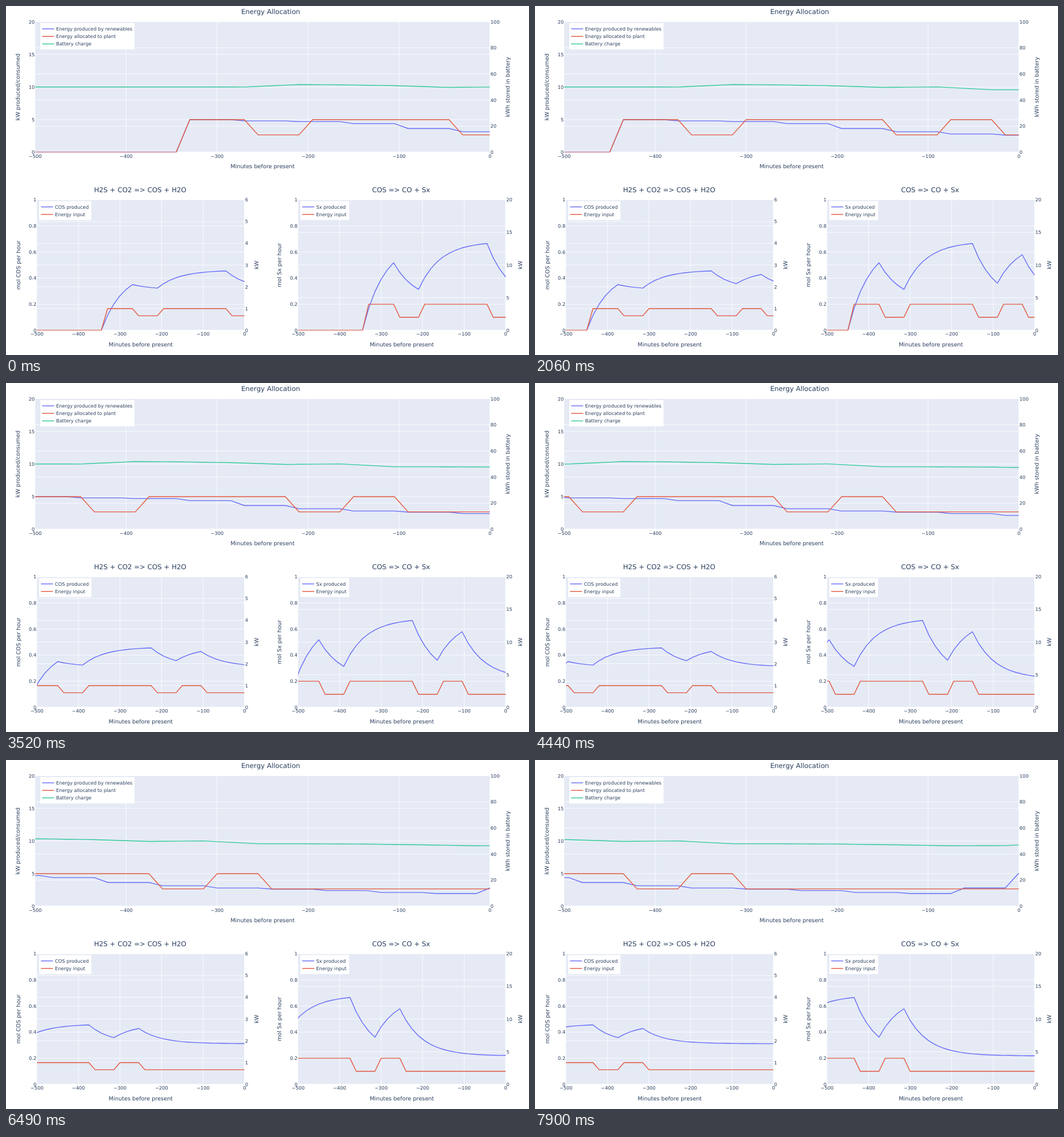
Animation of 916 by 611 pixels, one loop 8000 ms. Source, as an HTML page:

```html
<!DOCTYPE html>
<html lang="en">
<head>
<meta charset="utf-8">
<title>Energy Allocation</title>
<style>
  html, body { margin: 0; width: 100%; height: 100%; overflow: hidden; background: #fff; }
  svg { display: block; width: 916px; height: 611px; }
  text { font-family: "DejaVu Sans", Verdana, sans-serif; fill: #2a3f5f; text-rendering: geometricPrecision; }
  .tick { font-size: 8.3px; }
  .axis { font-size: 9.7px; }
  .title { font-size: 11.8px; }
  .trace { fill: none; stroke-width: 1.4; stroke-linejoin: round; }
</style>
</head>
<body>
<svg id="stage" viewBox="0 0 916 611"></svg>
<script>
const BLUE = '#666cf6', RED = '#e4563c', GREEN = '#2fc898';
const LOOP = 8000, STEP = 15, SPAN = 500;
const stage = document.getElementById('stage');

function add(parent, tag, attrs, text) {
  const node = document.createElementNS('http://www.w3.org/2000/svg', tag);
  for (const key in attrs) node.setAttribute(key, attrs[key]);
  if (text !== undefined) node.textContent = text;
  parent.append(node);
  return node;
}

function label(cls, x, y, text, anchor = 'middle', turned = false) {
  const attrs = { class: cls, x, y, 'text-anchor': anchor };
  if (turned) attrs.transform = `rotate(-90 ${x} ${y})`;
  add(stage, 'text', attrs, text);
}

// Simulated plant: one sample every 15 minutes, index 0 = present at loop start.
const FIRST = -36, LAST = 26, START = -22;
const SUPPLY = [5, 4.81, 4.7, 4.39, 3.64, 3.15, 2.8, 2.63, 2.4, 2.12, 1.95, 2.81, 5.1];
const KEEP = 0.752;

function simulate() {
  const samples = [];
  let battery = 50, cos = 0, sx = 0;
  for (let k = FIRST; k <= LAST; k++) {
    const running = k >= START;
    const full = k <= -18 || (k >= -13 && k <= -3) || (k >= 2 && k <= 5);
    const supply = running ? SUPPLY[Math.floor((k - START) / 4)] : 0;
    const cosPower = running ? (full ? 1 : 2 / 3) : 0;
    const sxPower = running ? (full ? 4 : 2) : 0;
    const plant = cosPower + sxPower;
    if (running) {
      const surplus = (supply - plant) / 4;
      battery += surplus > 0 ? surplus * 0.9 : surplus;
      const cosGoal = full ? 0.461 : 0.311, sxGoal = full ? 0.681 : 0.218;
      cos = cosGoal + (cos - cosGoal) * KEEP;
      sx = sxGoal + (sx - sxGoal) * KEEP;
    }
    samples.push({ k, supply, plant, battery, cos, sx, cosPower, sxPower });
  }
  return samples;
}
const samples = simulate();

const charts = [
  {
    left: 51.2, right: 847.6, top: 27.5, bottom: 256.1,
    title: 'Energy Allocation', titleX: 463.5, titleY: 14,
    leftTitle: 'kW produced/consumed', leftTitleX: 24,
    rightTitle: 'kWh stored in battery', rightTitleX: 882,
    max: 20, step: 5, max2: 100, step2: 20,
    legend: { x: 60, y: 30, w: 165, h: 46 },
    traces: [
      { key: 'supply', name: 'Energy produced by renewables', color: BLUE, max: 20 },
      { key: 'plant', name: 'Energy allocated to plant', color: RED, max: 20 },
      { key: 'battery', name: 'Battery charge', color: GREEN, max: 100 }
    ]
  },
  {
    left: 54.2, right: 417.8, top: 339.2, bottom: 567.8,
    title: 'H2S + CO2 => COS + H2O', titleX: 235, titleY: 326,
    leftTitle: 'mol COS per hour', leftTitleX: 25,
    rightTitle: 'kW', rightTitleX: 442,
    max: 1, step: 0.2, max2: 6, step2: 1,
    legend: { x: 58, y: 341.7, w: 91.5, h: 33 },
    traces: [
      { key: 'cos', name: 'COS produced', color: BLUE, max: 1 },
      { key: 'cosPower', name: 'Energy input', color: RED, max: 6 }
    ]
  },
  {
    left: 511.6, right: 875.2, top: 339.2, bottom: 567.8,
    title: 'COS => CO + Sx', titleX: 692, titleY: 326,
    leftTitle: 'mol Sx per hour', leftTitleX: 482,
    rightTitle: 'kW', rightTitleX: 904,
    max: 1, step: 0.2, max2: 20, step2: 5,
    legend: { x: 515.5, y: 341.7, w: 85.5, h: 33 },
    traces: [
      { key: 'sx', name: 'Sx produced', color: BLUE, max: 1 },
      { key: 'sxPower', name: 'Energy input', color: RED, max: 20 }
    ]
  }
];

function build(chart, index) {
  const { left, right, top, bottom, legend } = chart;
  const width = right - left, height = bottom - top, midY = (top + bottom) / 2;
  const area = { x: left, y: top, width, height };
  const line = (x1, y1, x2, y2, stroke, w) =>
    add(stage, 'line', { x1, y1, x2, y2, stroke, 'stroke-width': w });
  add(stage, 'rect', { ...area, fill: '#e5eaf5' });

  for (let minute = -SPAN; minute <= 0; minute += 100) {
    const x = right + minute / SPAN * width;
    if (minute > -SPAN) line(x, top, x, bottom, '#fff', minute ? 0.8 : 1.4);
    label('tick', x, bottom + 9.5, String(minute).replace('-', '\u2212'));
  }
  const scale = (max, step, x, anchor) => {
    const count = Math.round(max / step);
    for (let i = 0; i <= count; i++) {
      const y = bottom - i / count * height;
      line(left, y, right, y, '#fff', i ? 0.8 : 1.4);
      label('tick', x, y + 3, String(+(i * step).toFixed(1)), anchor);
    }
  };
  scale(chart.max, chart.step, left - 1, 'end');
  scale(chart.max2, chart.step2, right + 1, 'start');

  const clip = add(stage, 'clipPath', { id: 'area' + index });
  add(clip, 'rect', { ...area, height: height + 0.2 });
  const plot = add(stage, 'g', { 'clip-path': `url(#area${index})` });
  for (const trace of chart.traces)
    trace.node = add(plot, 'path', { class: 'trace', stroke: trace.color });

  add(stage, 'rect', { x: legend.x, y: legend.y, width: legend.w, height: legend.h, fill: '#fff' });
  chart.traces.forEach((trace, i) => {
    const y = legend.y + 10 + i * 13.2;
    line(legend.x + 3.3, y, legend.x + 24.3, y, trace.color, 1.4);
    label('tick', legend.x + 27.7, y + 3, trace.name, 'start');
  });

  label('title', chart.titleX, chart.titleY, chart.title);
  label('axis', (left + right) / 2, bottom + 28, 'Minutes before present');
  label('axis', chart.leftTitleX, midY, chart.leftTitle, 'middle', true);
  label('axis', chart.rightTitleX, midY, chart.rightTitle, 'middle', true);
}
charts.forEach(build);

const TICKS = [260, 520, 850, 1120, 1450, 1730, 2060, 2320, 2650, 2910, 3190, 3520, 3780,
  4110, 4440, 4700, 4960, 5290, 5560, 5890, 6160, 6490, 6770, 7300, 7630, 7900];

function render(now) {
  const visible = samples.filter(s => s.k <= now);
  for (const { left, right, top, bottom, traces } of charts)
    for (const { node, key, max } of traces)
      node.setAttribute('d', 'M' + visible.map(s => {
        const x = right + (s.k - now) * STEP / SPAN * (right - left);
        const y = bottom - s[key] / max * (bottom - top);
        return x.toFixed(2) + ' ' + y.toFixed(2);
      }).join('L'));
}

let shown = -1;
const origin = performance.now();
function frame() {
  const time = (performance.now() - origin) % LOOP;
  const now = TICKS.filter(t => t <= time).length;
  if (now !== shown) render(shown = now);
  requestAnimationFrame(frame);
}
frame();
</script>
</body>
</html>
```
